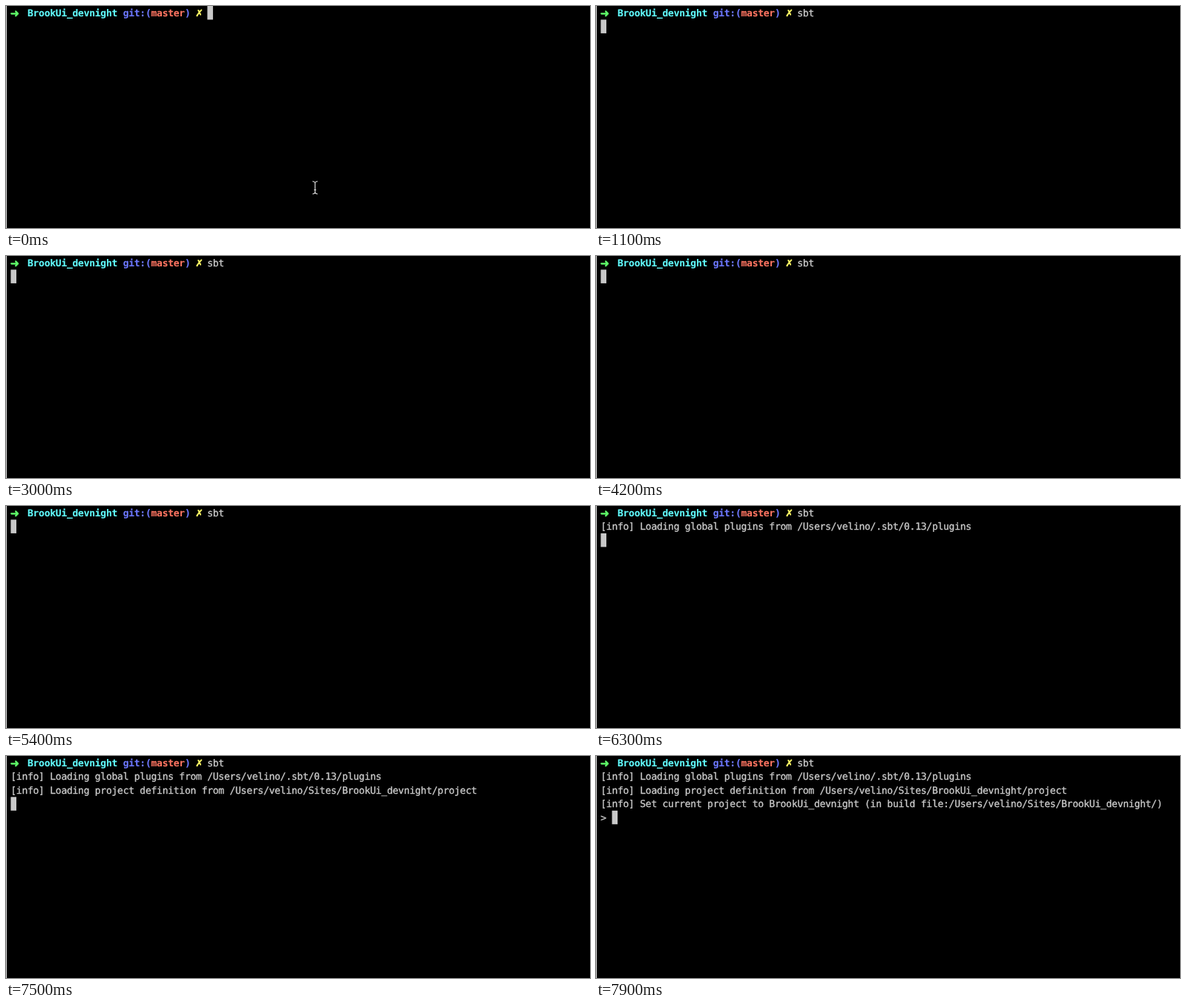
An HTML page with a canvas that plays this animation: 787 px wide and 300 px high, repeating every 8000 ms.

```html
<!DOCTYPE html>
<html lang="en">
<head>
<meta charset="utf-8">
<title>Terminal</title>
<style>
html, body { margin: 0; width: 100%; height: 100%; overflow: hidden; background: #000; }
canvas { display: block; }
</style>
</head>
<body>
<canvas id="stage" width="787" height="300"></canvas>
<script>
const ctx = document.getElementById('stage').getContext('2d');
const LOOP = 8000, STEP = 100;
const LEFT = 6.4, CELL = 7.57, ROW = 18.45, BASE = 14;
const MONO = '13px "DejaVu Sans Mono", monospace';
const GREY = '#c9c9c9';
const PROJECT = 'BrookUi_devnight', HOME = '/Users/velino';

const PROMPT = [
  [3, PROJECT, '#60fdff'],
  [20, 'git:(', '#6d78ff'],
  [25, 'master', '#ff7562'],
  [31, ')', '#6d78ff']
];
const COMMAND = 'sbt', COMMAND_COL = 35;
const KEYS = [300, 500, 700], ENTER = 1000;
const OUTPUT = [
  [5900, `[info] Loading global plugins from ${HOME}/.sbt/0.13/plugins`],
  [6800, `[info] Loading project definition from ${HOME}/Sites/${PROJECT}/project`],
  [7700, `[info] Set current project to ${PROJECT} (in build file:${HOME}/Sites/${PROJECT}/)`],
  [7700, '> ']
];

const colX = col => LEFT + col * CELL;

// A thin outline gives the glyphs the weight of smoothed screen text.
function glyph(ch, x, y, color, outline) {
  ctx.fillStyle = ctx.strokeStyle = color;
  ctx.lineWidth = outline;
  ctx.fillText(ch, x, y);
  ctx.strokeText(ch, x, y);
}

// Each character sits on the terminal grid.
function write(col, row, text, color = GREY, weight = '') {
  ctx.font = weight + ' ' + MONO;
  const y = Math.round(BASE + row * ROW);
  const outline = weight ? 0.1 : 0.35;
  [...text].forEach((ch, i) => glyph(ch, colX(col + i) - 0.15, y, color, outline));
}

function symbol(ch, x, y, size, color) {
  ctx.font = `${size}px "DejaVu Sans", sans-serif`;
  glyph(ch, x, y, color, 0.5);
}

function block(col, row) {
  ctx.fillStyle = GREY;
  ctx.fillRect(colX(col), row * ROW, CELL, ROW);
}

function pointer(x, y) {
  ctx.strokeStyle = '#d8d8d8';
  ctx.lineWidth = 1.2;
  ctx.beginPath();
  for (const s of [-1, 1]) {
    ctx.moveTo(x - 3.5, y + s * 8.5);
    ctx.quadraticCurveTo(x, y + s * 8.5, x, y + s * 5.5);
    ctx.quadraticCurveTo(x, y + s * 8.5, x + 3.5, y + s * 8.5);
  }
  ctx.moveTo(x, y - 6);
  ctx.lineTo(x, y + 6);
  ctx.moveTo(x - 1.5, y + 3);
  ctx.lineTo(x + 1.5, y + 3);
  ctx.stroke();
}

function draw(t) {
  ctx.fillStyle = '#000';
  ctx.fillRect(0, 0, 787, 300);
  ctx.fillStyle = '#dedede';
  ctx.fillRect(0, 0, 1, 300);

  symbol('➜', 5.6, 14.5, 15, '#5ffa68');
  for (const [col, text, color] of PROMPT) write(col, 0, text, color, 'bold');
  symbol('✗', 255.3, 14, 12.6, '#fffc67');

  const typed = KEYS.filter(k => t >= k).length;
  write(COMMAND_COL, 0, COMMAND.slice(0, typed));
  if (!typed) pointer(416.5, 245.5);

  if (t < ENTER) {
    block(COMMAND_COL + typed, 0);
    return;
  }
  const lines = OUTPUT.filter(([at]) => t >= at);
  lines.forEach(([, text], i) => write(0, i + 1, text));
  if (lines.length === OUTPUT.length) block(2, lines.length);
  else block(0, lines.length + 1);
}

ctx.textRendering = 'geometricPrecision';
ctx.lineJoin = 'round';
const start = performance.now();
function tick() {
  const t = (performance.now() - start) % LOOP;
  draw(Math.floor(t / STEP) * STEP);
  requestAnimationFrame(tick);
}
tick();
</script>
</body>
</html>
```
